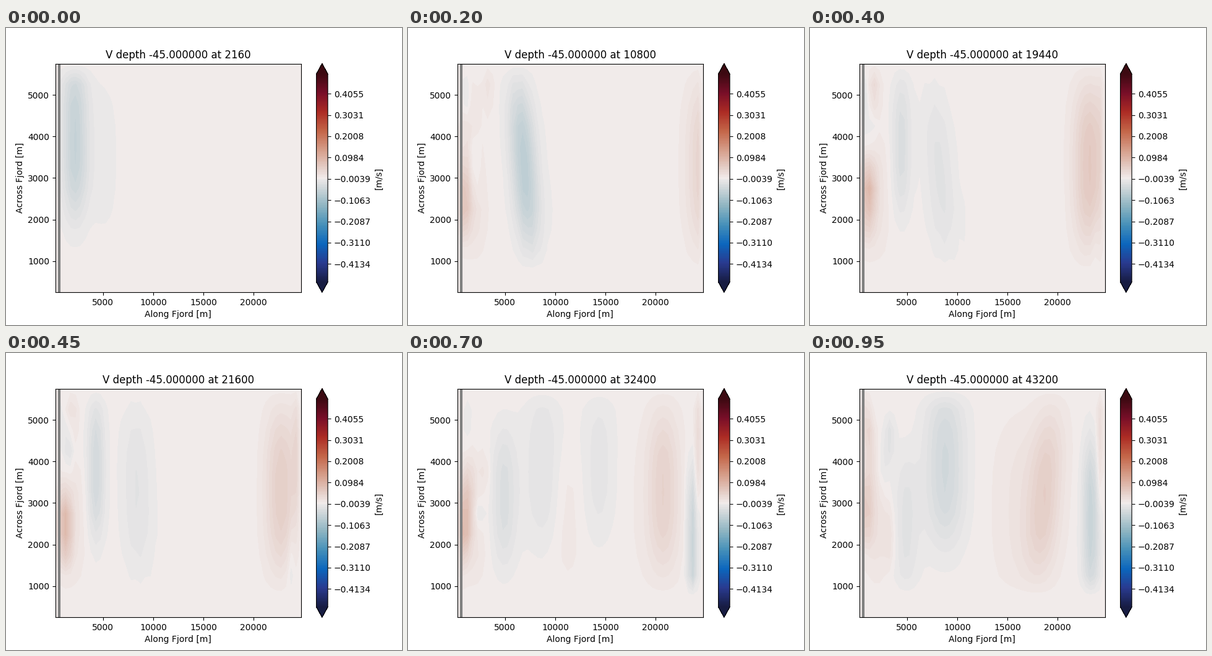
Animation, 640 px wide and 480 px high, one loop 1000 ms. Source, as a matplotlib script:

```python
import numpy as np
import matplotlib.pyplot as plt
from matplotlib.animation import FuncAnimation
from matplotlib.colors import LinearSegmentedColormap

FRAMES, INTERVAL, TIME_STEP = 20, 50, 2160
LEVELS = np.linspace(-0.5, 0.5, 128)
plt.rcParams["text.kerning_factor"] = 6

# Diverging blue-red map, twelve even steps plus a pale middle.
COOL = ["#171c42", "#293a8f", "#0b66bd", "#4590b9", "#8eb5c2", "#d2d8db"]
WARM = ["#e6d2cc", "#d59d89", "#c46548", "#ac2b24", "#780e28", "#3c0911"]
places = np.linspace(0, 1, 12)
balance = LinearSegmentedColormap.from_list(
    "balance",
    [*zip(places[:6], COOL), (0.5, "#f1eceb"), *zip(places[6:], WARM)], N=256)

# Velocity grid in km, 500 m cells; the outermost cells are still.
x = np.arange(0.25, 25, 0.5)
y = np.arange(0.25, 6, 0.5)
X, Y = np.meshgrid(x, y)
WATER = (X > 0.5) & (X < 24.5) & (Y > 1) & (Y < 5.5)
ODD = np.arange(x.size) % 2


def ramp(t, start, end):
    u = np.clip((t - start) / (end - start), 0, 1)
    return u * u * (3 - 2 * u)


def bump(t, peak, spread):
    return np.exp(-((t - peak) / spread) ** 2)


def eddy(cx, cy, width, height, slant=0):
    dy = Y - cy
    dx = (X - cx - slant * dy) / width
    return np.exp(-(dx**2 + np.abs(dy / height) ** 3) / 2)


def wall_eddies(t):
    """Short-lived swirls of mixed sign shed along the near wall."""
    rng = np.random.default_rng(4)
    field = np.zeros_like(X)
    for peak in np.linspace(2, 20, 36):
        cx = 0.75 + min(rng.exponential(0.8), 2.5)
        cy = rng.uniform(1.25, 5.25)
        speed = rng.choice([0.035, 0.025, -0.03])
        shape = eddy(cx, cy, rng.uniform(0.25, 0.45), rng.uniform(0.3, 0.6))
        field += speed * bump(t, peak, 1.3) * shape
    return field


def near_field(t):
    """Cold eddies leaving the wall and the warm patch behind them."""
    front = 8.8 - 6.6 * np.exp(-t / 3.2)
    speed = 0.02 + 0.075 * bump(t, 2.3, 3) + 0.025 * ramp(t, 14, 19)
    height = (1.4 + 0.1 * ramp(t, 0, 3)) * (1 + 0.08 * bump(t, 7, 4) * (ODD - 0.5))
    field = -speed * eddy(front, 3.9 - 0.9 * bump(t, 6.5, 4),
                          0.9 + 0.5 * ramp(t, 2, 19), height,
                          -0.8 * bump(t, 6, 2))
    field -= 0.01 * bump(t, 0, 3) * eddy(front + 2.9, 3.5, 0.9, 1.3)
    field -= 0.025 * bump(t, 2, 2) * eddy(2, 5.2, 1.2, 0.4)

    second = ramp(t, 6, 9) * (0.045 - 0.022 * ramp(t, 9, 18))
    field -= second * eddy(4.9 - 0.6 * bump(t, 9, 2), 3.8 - 1.3 * ramp(t, 9, 19),
                           0.9 - 0.3 * bump(t, 9, 2), 1.3)

    patch_y = np.interp(t, [2, 6, 9, 12, 14, 19], [2.8, 2.4, 2.4, 3.7, 2.75, 2.9])
    field += 0.05 * ramp(t, 0, 2) * eddy(0.9, patch_y, 0.5, 0.7)
    return field + 0.016 * ramp(t, 0, 3) * eddy(2, 2.6, 0.8, 1.1)


def far_field(t):
    """Warm wave entering from the far end with a cold jet behind it."""
    crest = 24 - 0.4 * (t - 6)
    speed = ramp(t, 0, 6) * (0.042 + 0.035 * bump(t, 6, 2.5))
    field = speed * eddy(crest, 3.3, 1.1, 1.5, 0.3 * ramp(t, 14, 19))
    field += 0.016 * ramp(t, 12, 19) * eddy(crest - 2, 2.9, 2, 1.6)

    jet = ramp(t, 6, 14)
    field -= 0.06 * jet * eddy(23.75 - 0.4 * ramp(t, 12, 19), 1.4 + 1.2 * ramp(t, 8, 19),
                               0.3 + 0.3 * ramp(t, 12, 19), 0.6 + 0.9 * jet)
    return field + 0.03 * ramp(t, 7, 10) * eddy(24.25, 4.3, 0.25, 1.1)


def middle_field(t):
    """Weak bands in mid-fjord and the two-cell ripple."""
    field = -0.017 * bump(t, 13.5, 3) * eddy(16.2 - 0.9 * (t - 12), 3.9, 1.2, 1.4)
    field += 0.009 * bump(t, 13.5, 2) * eddy(11.2, 2.7, 1, 1.2)
    field += 0.0065 * bump(t, 2, 1.5) * eddy(15, 2.4, 1.7, 0.6)
    ripple = ODD * eddy(14.5, 1.9, 3.6, 0.75) + 0.3 * eddy(12, 2.1, 1, 0.7)
    return field - 0.007 * bump(t, 6, 2.5) * ripple


def draw_field(step):
    velocity = near_field(step) + wall_eddies(step) + middle_field(step) + far_field(step)
    return ax.contourf(X * 1000, Y * 1000, velocity * WATER, LEVELS,
                       cmap=balance, extend="both")


fig, ax = plt.subplots(figsize=(6.4, 4.8), dpi=100)
contours = draw_field(0)
fig.colorbar(contours, ax=ax, label="[m/s]")
ax.axvline(620, color="gray", lw=3)
ax.set(xlim=(250, 24750), ylim=(250, 5750),
       xlabel="Along Fjord [m]", ylabel="Across Fjord [m]")


def update(step):
    global contours
    contours.remove()
    contours = draw_field(step)
    ax.set_title(f"V depth -45.000000 at {TIME_STEP * (step + 1)}")
    return []


anim = FuncAnimation(fig, update, frames=FRAMES, interval=INTERVAL,
                     init_func=lambda: [], repeat=True, repeat_delay=0)
plt.show()
```
